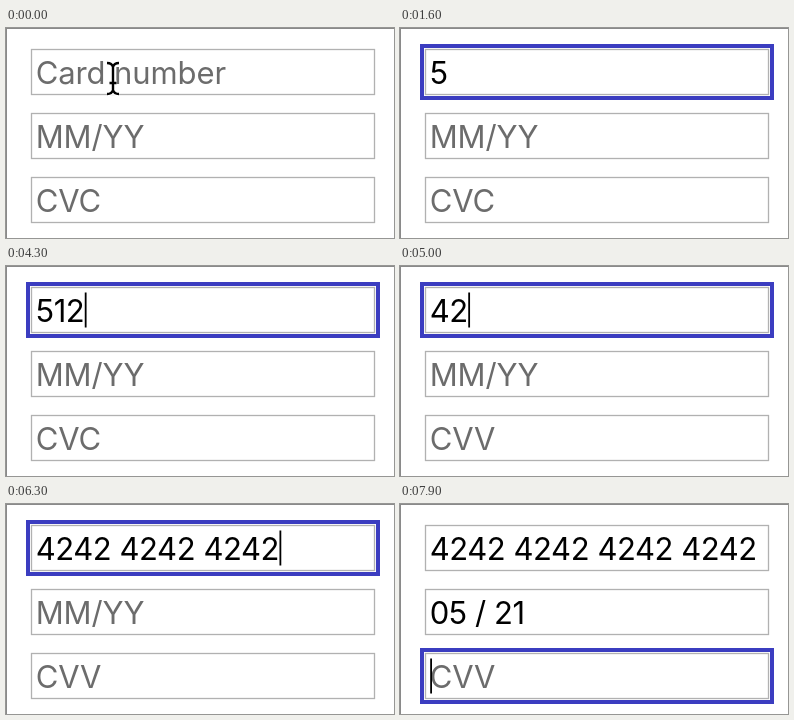
Write an HTML page that moves like this. It is 388 px wide and 210 px high and loops after 8000 ms.

```html
<!DOCTYPE html>
<html lang="en">
<head>
<meta charset="utf-8">
<title>Card form</title>
<style>
html, body { margin: 0; width: 100%; height: 100%; overflow: hidden; background: #fff; }
svg { display: block; width: 388px; height: 210px; }
text { font: 400 31px Inter, Roboto, sans-serif; white-space: pre; }
.hint { fill: #6c6c6c; letter-spacing: -.1px; }
.value { fill: #000; letter-spacing: -.45px; }
.box { fill: #fff; stroke: #b1b1b1; stroke-width: 1.3; }
.ring { fill: none; stroke: #3b3dc0; stroke-width: 4; }
</style>
</head>
<body>
<svg id="stage" viewBox="0 0 388 210">
  <path d="M0 .5H388M.5 0V210" stroke="#8a8a8a" fill="none"/>
</svg>
<script>
const LOOP = 8000, LEFT = 29.7, TOP = 21.5, GAP = 64;
const stage = document.getElementById('stage');

function add(tag, attrs) {
  const el = document.createElementNS('http://www.w3.org/2000/svg', tag);
  for (const key in attrs) el.setAttribute(key, attrs[key]);
  return stage.appendChild(el);
}

const fields = [0, 1, 2].map(i => {
  const y = TOP + i * GAP;
  add('rect', { class: 'box', x: 25.5, y, width: 343, height: 45 });
  return add('text', { x: LEFT, y: y + 34.5 });
});
const ring = add('rect', { class: 'ring', x: 22, width: 350, height: 52 });
const caret = add('rect', { width: 1.8, height: 35 });
const beam = add('g', {});
const beamPath = 'M-6-15.5Q-1-15.5 0-11.5Q1-15.5 6-15.5M0-11.5V11.5M-6 15.5Q-1 15.5 0 11.5Q1 15.5 6 15.5M-3.5 4.5H3.5';
for (const [stroke, width] of [['#fff', 5], ['#000', 2.4]]) {
  beam.appendChild(add('path', { d: beamPath, fill: 'none', stroke, 'stroke-width': width }));
}

// Each entry: time, text from then on
const card = [
  [0, ''], [1100, '5'], [2100, '51'], [2700, '512'], [3100, '5123'],
  [3300, '5123 4'], [3500, '5123 45'], [4000, '5123 4'], [4100, '5123'],
  [4300, '512'], [4500, '51'], [4600, '5'], [4700, ''], [4900, '4'],
  [5000, '42'], [5200, '424'], [5300, '4242'], [5500, '4242 42'],
  [5700, '4242 4242'], [5900, '4242 4242 4'], [6000, '4242 4242 42'],
  [6300, '4242 4242 4242'], [6500, '4242 4242 4242 42'],
  [6800, '4242 4242 4242 424'], [6900, '4242 4242 4242 4242']
];
const expiry = [[0, ''], [7200, '0'], [7300, '05 / '], [7800, '05 / 2'], [7900, '05 / 21']];
const focus = [[0, -1], [400, 0], [6900, 1], [7900, 2]];

function at(steps, t) {
  let value;
  for (const [start, v] of steps) if (t >= start) value = v;
  return value;
}

function show(el, on) {
  el.setAttribute('visibility', on ? 'visible' : 'hidden');
}

function draw(t) {
  const values = [at(card, t), at(expiry, t), ''];
  const hints = ['Card number', 'MM/YY', t < 4900 ? 'CVC' : 'CVV'];
  fields.forEach((el, i) => {
    const text = values[i] || hints[i];
    if (el.textContent !== text) el.textContent = text;
    el.setAttribute('class', values[i] ? 'value' : 'hint');
  });

  const active = at(focus, t);
  const blinkOff = t < 500 || (t >= 1000 && t < 1100) || (t >= 1600 && t < 2100);
  show(ring, active >= 0);
  show(caret, active >= 0 && !blinkOff);
  if (active >= 0) {
    const y = TOP + active * GAP;
    const width = values[active] ? fields[active].getComputedTextLength() : 0;
    ring.setAttribute('y', y - 3.5);
    caret.setAttribute('x', 30.2 + width);
    caret.setAttribute('y', y + 5);
  }

  show(beam, t < 1100);
  beam.setAttribute('transform', `translate(${t < 100 ? 107 : 108} 50.5)`);
}

function tick(now) {
  draw(now % LOOP);
  requestAnimationFrame(tick);
}
draw(0);
requestAnimationFrame(tick);
</script>
</body>
</html>
```
